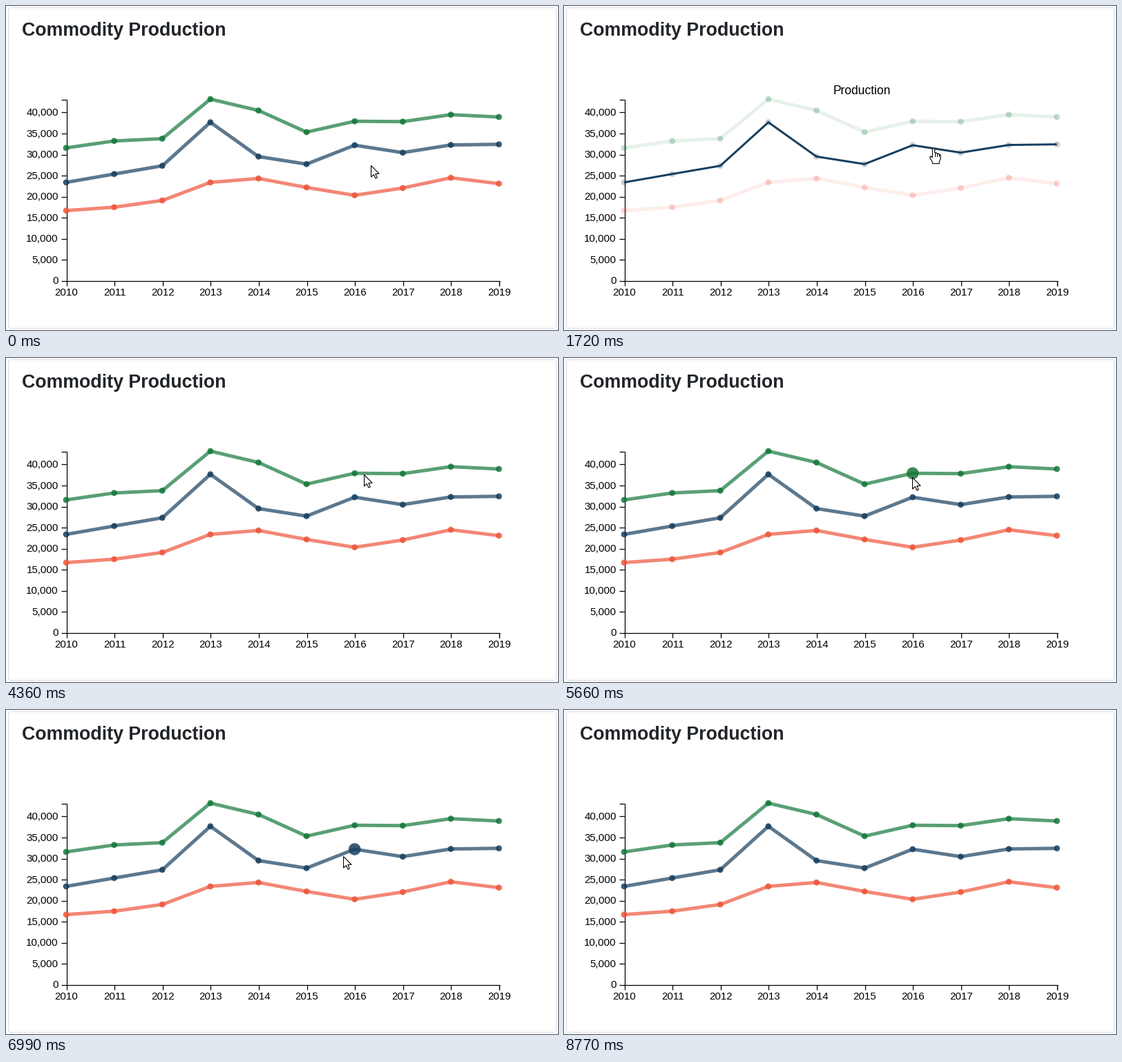
Recreate the animation shown at these times as a matplotlib script. Size 799 by 470 pixels, loop 9.38 s.

```python
import numpy as np
import matplotlib.pyplot as plt
from matplotlib.animation import FuncAnimation
from matplotlib.patches import Circle, FancyBboxPatch, Polygon

W, H, DPI = 799, 470, 64
PT = 72 / DPI                      # points per pixel
LOOP, STEP = 9380, 35
X0, X1, Y0, SCALE = 87, 713.5, 398, 0.0061
R, R_HOVER, GROW = 4.4, 8.75, 250

SERIES = {
    "Total Supply": ("#14773a", [31500, 33150, 33700, 43100, 40400,
                                 35250, 37838, 37750, 39400, 38850]),
    "Production": ("#173f5f", [23300, 25288, 27246, 37589, 29442,
                               27647, 32140, 30377, 32201, 32348]),
    "Exports": ("#ed553b", [16600, 17400, 19000, 23300, 24235,
                            22100, 20230, 21960, 24400, 23000]),
}
xs = np.linspace(X0, X1, 10)


def y_of(value):
    return Y0 - np.asarray(value) * SCALE


# Cursor moves: start, end, number of steps, x, y, what is hovered on arrival.
# A dot is hovered as (series, index); a line by its series name.
MOVES = [
    (80, 460, 6, 547, 269, "Exports"),
    (630, 630, 1, 549, 270, "Exports"),
    (1180, 1720, 8, 535, 206, "Production"),
    (2500, 2730, 4, 536, 164, None),
    (2810, 2810, 1, 537, 163, None),
    (3040, 3040, 1, 535, 162, None),
    (3270, 3350, 2, 532, 164, None),
    (3650, 3650, 1, 531, 167, "Total Supply"),
    (4280, 4360, 2, 518, 169, None),
    (4430, 4740, 5, 504, 168, ("Total Supply", 6)),
    (5660, 6130, 7, 502, 203, "Production"),
    (6300, 6300, 1, 503, 202, ("Production", 6)),
    (6990, 7370, 6, 412, 261, None),
    (7450, 7520, 2, 390, 256, "Exports"),
    (7600, 7740, 3, 367, 251, ("Exports", 4)),
    (8460, 8690, 4, 484, 458, None),
    (8770, 8770, 1, 520, 540, None),
]


def build_poses():
    poses = [(0, 528, 231, None)]
    for start, end, n, x, y, hover in MOVES:
        _, px, py, _ = poses[-1]
        for k, t in enumerate(np.linspace(start, end, n), 1):
            f = k / n
            poses.append((t, round(px + (x - px) * f), round(py + (y - py) * f),
                          hover if k == n else None))
    return poses


POSES = build_poses()


def dot_spans():
    """Time spans in which a dot is hovered."""
    spans = []
    for (t, _, _, hover), nxt in zip(POSES, POSES[1:]):
        if isinstance(hover, tuple):
            spans.append((hover, t, nxt[0]))
    return spans


SPANS = dot_spans()


def ease(f):
    f = min(max(f, 0), 1)
    return 4 * f ** 3 if f < 0.5 else 1 - 4 * (1 - f) ** 3


fig = plt.figure(figsize=(W / DPI, H / DPI), dpi=DPI, facecolor="white")
ax = fig.add_axes([0, 0, 1, 1])
ax.set(xlim=(0, W), ylim=(H, 0))
ax.axis("off")


def label(x, y, text, size, **kw):
    kw.setdefault("color", "black")
    return ax.text(x, y, text, fontsize=size * PT, family="Liberation Sans",
                   va="baseline", **kw)


def rule(px, py):
    ax.plot(px, py, color="black", lw=1.25 * PT, solid_capstyle="butt",
            solid_joinstyle="miter", zorder=1)


# Card and heading
ax.add_patch(FancyBboxPatch((3.5, 2.5), 793, 465, fc="white", ec="#dfdfdf",
                            lw=1.1 * PT, zorder=0,
                            boxstyle="round,pad=0,rounding_size=4.5"))
label(23, 43, "Commodity Production", 26.8, weight="bold", color="#212529")

# Axes
rule([80, 87.5, 87.5], [135.5, 135.5, 399])
rule([87, 714.5], [398.5, 398.5])
rule([714, 714], [398.5, 406])
for k in range(9):
    y = Y0 + 0.5 - 5000 * k * SCALE
    rule([80, 87.5], [y, y])
    label(75.8, y + 4.8, f"{5000 * k:,}", 15, ha="right")
for k, x in enumerate(xs):
    rule([x + 0.5, x + 0.5], [398.5, 406])
    label(x + 0.5, 420, str(2010 + k), 15, ha="center")

# Series
lines, dots = {}, {}
for z, (name, (color, values)) in enumerate(SERIES.items()):
    ys = y_of(values)
    lines[name], = ax.plot(xs, ys, color=color, solid_capstyle="butt",
                           solid_joinstyle="miter", zorder=2 + z / 10)
    for k, (x, y) in enumerate(zip(xs, ys)):
        dots[name, k] = ax.add_patch(Circle((x, y), R, fc=color, lw=0, zorder=3))

caption = label(431.5, 128, "", 17.5, ha="center", zorder=4)
value_tip = label(0, 0, "", 17.5, ha="left", zorder=4)

# Cursors, relative to their hot spot
ARROW = np.array([(0, 0), (0, 16.5), (3.8, 13), (6.3, 18.5), (8.7, 17.5),
                  (6.3, 12), (11.5, 11.7)]) + 0.5
HAND = np.array([(-1.7, 1), (-0.9, 0.2), (0.9, 0.2), (1.7, 1), (1.7, 6.5),
                 (4, 6.6), (4.7, 7.5), (6.9, 7.7), (7.6, 8.6), (9.4, 9),
                 (10.2, 10.3), (10.2, 15), (8.3, 19), (8.3, 22.3),
                 (-1.6, 22.3), (-1.8, 20), (-5, 14.5), (-5.3, 12.8),
                 (-4, 11.6), (-1.7, 13.6)]) + (0, 0.3)
KNUCKLES = [(1.7, 6.5), (4.7, 7.5), (7.6, 8.6)]


def cursor(shape):
    return ax.add_patch(Polygon(shape, closed=True, fc="white", ec="black",
                                lw=1.1 * PT, joinstyle="round", zorder=6))


arrow, hand = cursor(ARROW), cursor(HAND)
knuckles = [ax.plot([], [], color="black", lw=PT, zorder=7)[0] for _ in KNUCKLES]


def draw_cursor(x, y, pointing):
    arrow.set_visible(not pointing)
    hand.set_visible(pointing)
    arrow.set_xy(ARROW + (x, y))
    hand.set_xy(HAND + (x, y))
    for line, (dx, dy) in zip(knuckles, KNUCKLES):
        line.set_visible(pointing)
        line.set_data([x + dx, x + dx], [y + dy, y + 11.5])


def dot_radii(t):
    radii = {}
    for key, start, end in SPANS:
        f = ease((t - start) / GROW) - ease((t - end) / GROW)
        radii[key] = R + (R_HOVER - R) * f
    return radii


def draw(i):
    t = i * STEP + 30
    _, x, y, hover = [p for p in POSES if p[0] <= t][-1]
    draw_cursor(x, y, hover is not None)

    active = hover if isinstance(hover, str) else None
    caption.set_text(active or "")
    for name, line in lines.items():
        line.set_linewidth((3 if name == active else 5) * PT)
        line.set_alpha(0.7 if not active else 1 if name == active else 0.1)

    radii = dot_radii(t)
    for key, dot in dots.items():
        dot.set_alpha(0.25 if active else 0.85)
        dot.set_radius(radii.get(key, R))

    if isinstance(hover, tuple):
        name, k = hover
        value = SERIES[name][1][k]
        value_tip.set_text(str(value))
        value_tip.set_position((xs[k] + 6, y_of(value) - 12.5))
    else:
        value_tip.set_text("")
    return []


anim = FuncAnimation(fig, draw, frames=LOOP // STEP, interval=STEP,
                     repeat=True, repeat_delay=0, blit=False)
plt.show()
```
